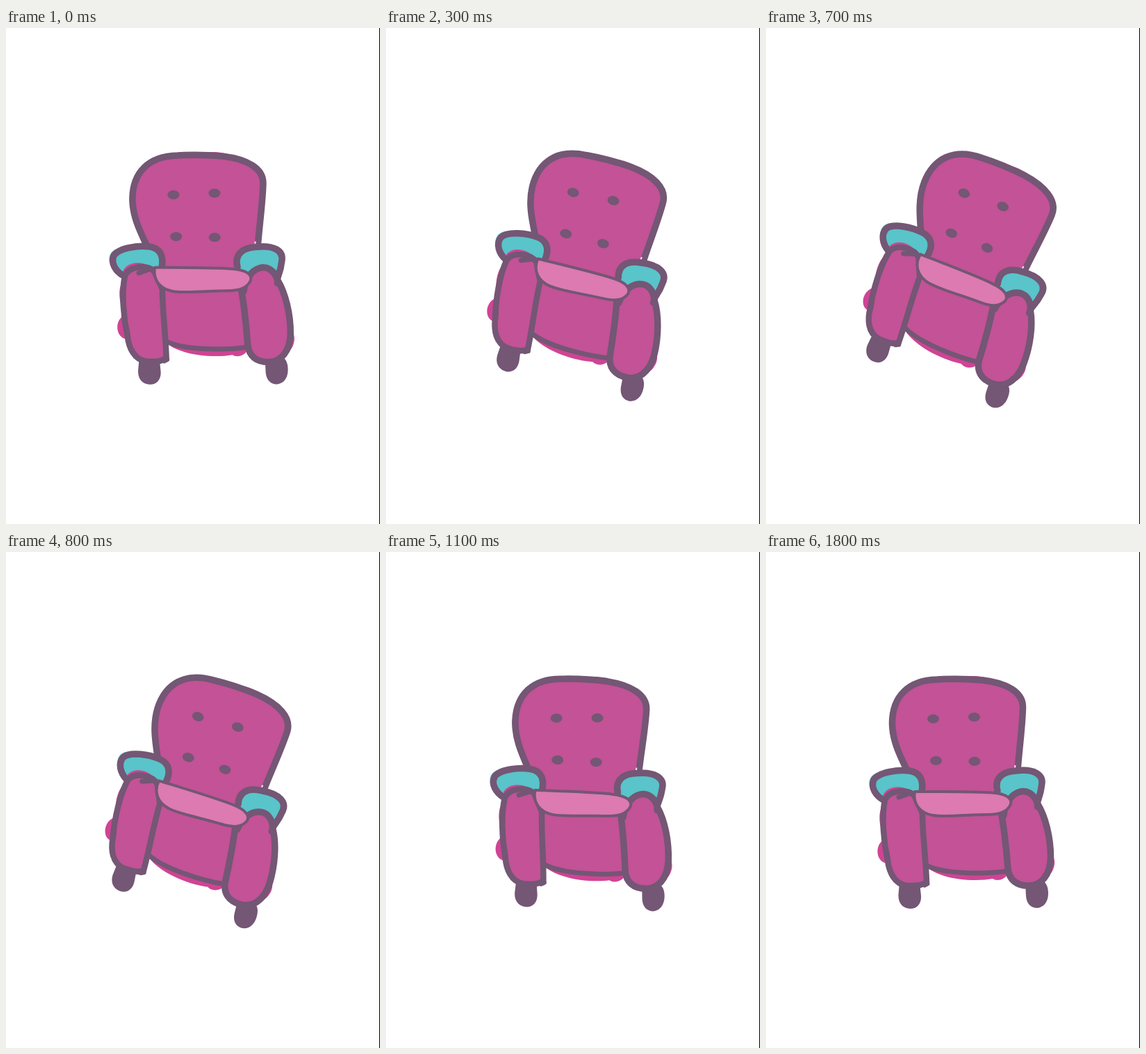
An HTML page for the animation above (1.9 s loop, 538x712 px).

```html
<!DOCTYPE html>
<html lang="en">
<head>
<meta charset="utf-8">
<title>Rocking armchair</title>
<style>
  html, body { margin: 0; width: 100%; height: 100%; overflow: hidden; background: #fff; }
  svg { display: block; width: 100%; height: 100%; }
  .pink { fill: #c35296; }
  .spill { fill: #cf4494; }
  .teal { fill: #59c4c9; }
  .cushion { fill: #dc7ab1; }
  .ink { fill: #745675; }
  .line { fill: none; }
  .line, .edge { stroke: #745675; stroke-width: 8.5; stroke-linecap: round; stroke-linejoin: round; }
  .thick { stroke-width: 9.5; }
  .thin { stroke-width: 7; }
  .fine { stroke-width: 4; }
</style>
</head>
<body>
<svg viewBox="0 0 538 712">
  <g id="chair">
    <!-- colour spilling past the outlines -->
    <path class="spill" d="M270 183Q298 173 324 183ZM174 355C162 366 162 382 165 396L171 412C158 418 157 438 168 445L180 450ZM406 430C419 436 418 456 404 468ZM236 456C262 472 304 473 326 469C332 473 343 471 348 462Z"/>

    <!-- back and seat front -->
    <path class="pink" d="M215 290L228 350V445C250 462 310 463 348 458L345 360L350 290Z"/>
    <path class="pink edge thick" d="M204 316C193 293 181.500 271 181.500 245C182 208 204 184 246 183C262 182 290 182 312 184C346 188 370 201 369.500 223C369 250 364 285 362 314"/>
    <path d="M358.500 306L358 311" stroke="#f4e4ee" stroke-width="2"/>
    <path class="line thin" d="M233 451C258 462 312 463 348 458"/>
    <g class="ink">
      <ellipse cx="240.500" cy="239.500" rx="8.500" ry="6.500"/>
      <ellipse cx="299.500" cy="237" rx="8.500" ry="6.500"/>
      <ellipse cx="244.500" cy="299.500" rx="8.500" ry="6.500"/>
      <ellipse cx="300" cy="300.500" rx="8.500" ry="6.500"/>
    </g>

    <!-- feet -->
    <path class="ink" d="M192 474L190.500 492C190 505 198 512 208 512C218 512 224 504 223 493L221 474ZM373 474L374 494C375 505 381 511 390 511C400 510 406 502 406 490C406 479 402 473 396 471Z"/>

    <!-- left arm -->
    <path class="teal" d="M160 317C147 321 146 335 152 340L170 355L223 345C227 328 222 316 207 314Z"/>
    <path class="line thick" d="M169 356C158 350 150 338 155 327C162 316 190 312 206 314C222 316 227 328 224 344"/>
    <path class="spill" d="M168 350C174 334 200 334 209 345L190 354Z"/>
    <path class="pink edge" d="M171 356C178 341 203 340 213 349L225 375C225 405 230 440 231 474C222 480 212 479 203 479C184 477 177 458 175 443C169 415 166 380 171 356Z"/>
    <path class="line thin" d="M191 352L205 347M174 432L176 444M228 478L232 476"/>

    <!-- right arm -->
    <path class="teal" d="M334 342C328 325 340 316 360 315C385 312 400 320 396 335L390 362L345 370Z"/>
    <path class="line thick" d="M333 343C328 325 340 315 360 314C385 311 400 319 396.500 335C395 350 391 354 390 362"/>
    <path class="pink edge thick" d="M342 378C346 341 381 331 391 362C402 380 409.500 410 409.500 438C409 465 395 478 380 479C360 480 350 470 348 455C346 430 342 395 339 378"/>
    <path class="line" d="M390 358V366"/>

    <path class="cushion edge fine" d="M214 344C250 344 300 343.500 325 345.500C347 347 354 354 352 362C347 373 336 377 318 377C290 377 260 381 240 378C222 375 211 362 214 344Z"/>
  </g>
  <path d="M537.500 0V712" stroke="#000"/>
</svg>
<script>
  const LOOP = 1900, STEP = 100, SWING = 23.6;
  const START = -33, PEAK = 567, END = 1233;
  const chair = document.getElementById("chair");
  const ease = u => (1 - Math.cos(Math.PI * u)) / 2;

  function angleAt(t) {
    if (t < PEAK) return SWING * ease((t - START) / (PEAK - START));
    if (t < END) return SWING * ease((END - t) / (END - PEAK));
    return 0;
  }

  function draw() {
    const t = Math.floor(performance.now() % LOOP / STEP) * STEP;
    chair.setAttribute("transform", `rotate(${angleAt(t).toFixed(2)} 269 356)`);
    requestAnimationFrame(draw);
  }
  draw();
</script>
</body>
</html>
```
